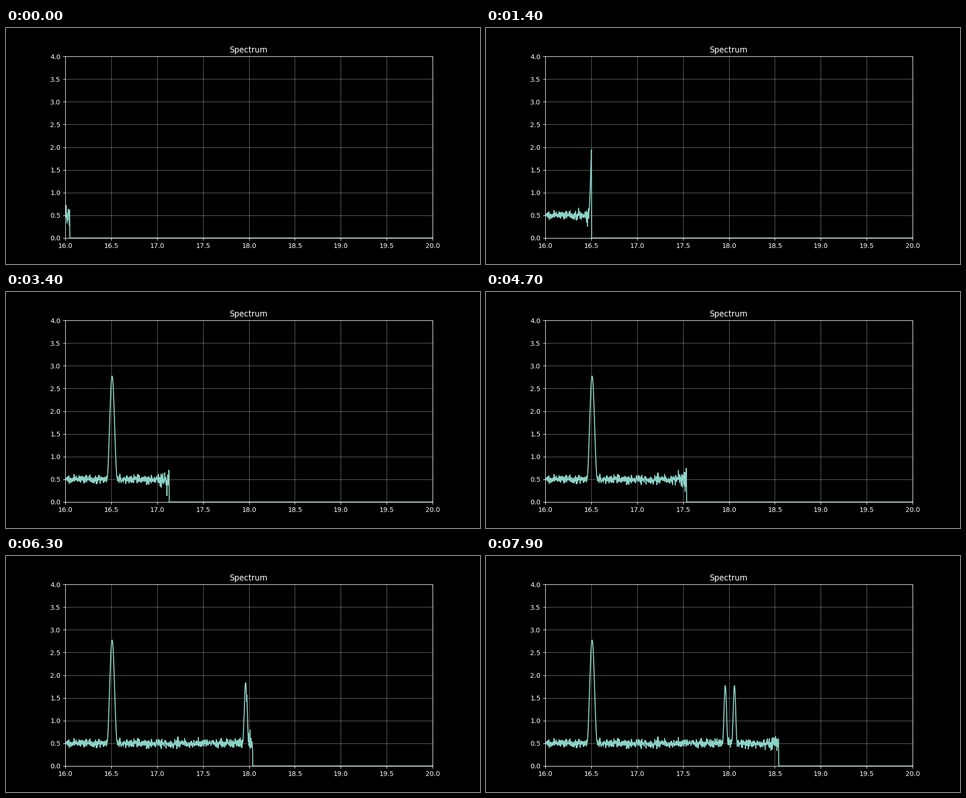
Animation of 1000x500 px, one loop 8000 ms. Source, as a matplotlib script:

```python
import numpy as np
import matplotlib.pyplot as plt
from matplotlib.animation import FuncAnimation

FRAMES = 80
PASSES = 7          # sweeps averaged before a bin settles
FLOOR = 0.5
NOISE = 0.12        # spread of a single sweep
PEAKS = [           # centre, half width, height above the floor
    (16.51, 0.057, 2.27),
    (17.96, 0.03, 1.27),
    (18.06, 0.03, 1.27),
]

x = np.linspace(16, 20, 1601)
bins = np.arange(x.size)
rng = np.random.default_rng(16)

# Frequency reached by the sweep: a quick start, then a steady pace
k = np.arange(FRAMES)
reach = 16.05 + 0.03135 * k + 0.015 * (1 - np.exp(-k / 3))
head = np.searchsorted(x, reach)
first_seen = np.searchsorted(head, bins, side="right")


def signal(shift):
    """Raised-cosine peaks, moved right by shift."""
    total = np.zeros_like(x)
    for mid, half, height in PEAKS:
        u = np.clip((x - mid - shift) / half, -1, 1)
        total += height * np.cos(np.pi / 2 * u) ** 2
    return total


# Each row is the running mean after one more sweep
sweeps = rng.normal(0, NOISE, (PASSES, x.size))
noise = np.cumsum(sweeps, axis=0) / np.arange(1, PASSES + 1)[:, None]

level = np.empty_like(noise)
for age in range(PASSES):
    gain = 1 + 0.09 * np.exp(-(age / 2) ** 2 / 2)
    sig = gain * signal(0.018 * np.exp(-0.8 * age))
    level[age] = FLOOR + sig + noise[age] * (sig < 0.03)


def spectrum(frame):
    age = np.clip(frame - first_seen, 0, PASSES - 1)
    return np.where(bins < head[frame], level[age, bins], 0)


plt.style.use("dark_background")
fig, ax = plt.subplots(figsize=(10, 5), dpi=100)
ax.set(xlim=(16, 20), ylim=(0, 4), title="Spectrum")
ax.grid(alpha=0.4)
line, = ax.plot(x, spectrum(0))


def update(frame):
    line.set_ydata(spectrum(frame))
    return line,


anim = FuncAnimation(fig, update, frames=FRAMES, interval=100, repeat=True, repeat_delay=0)
plt.show()
```
